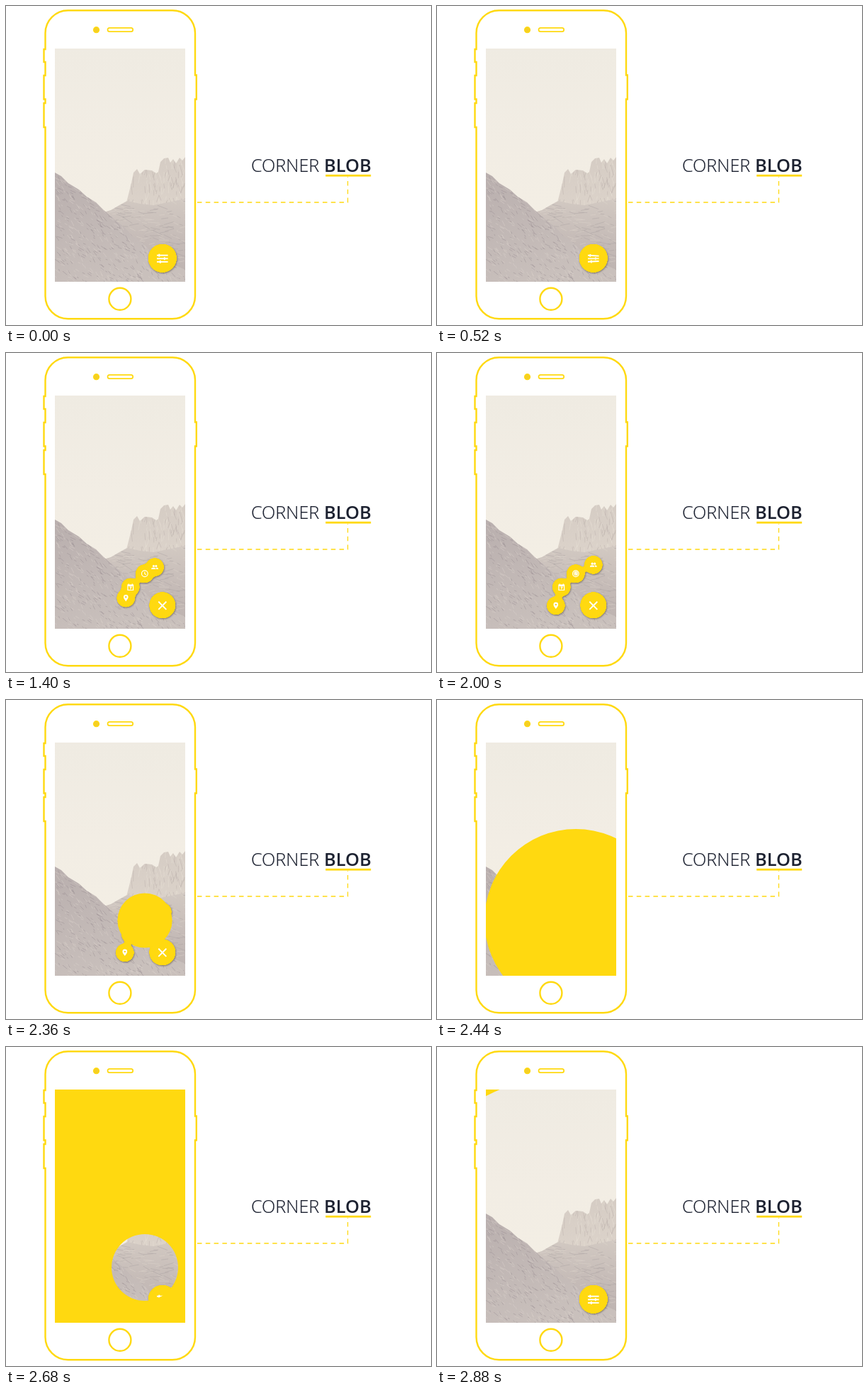
Animation, 600 px wide and 450 px high, one loop 3 s. Source, as an HTML page:

```html
<!DOCTYPE html>
<html lang="en">
<head>
<meta charset="utf-8">
<title>Corner Blob</title>
<style>
html, body { margin: 0; width: 100%; height: 100%; overflow: hidden; background: #fff; }
svg { display: block; width: 100vw; height: 100vh; }
.title { font-family: "Open Sans", sans-serif; fill: #1c2130; }
.line { fill: none; stroke: #ffd910; }
.ico { fill: none; stroke: #fff; stroke-width: 1.9; }
</style>
</head>
<body>
<svg viewBox="0 0 600 450" xmlns="http://www.w3.org/2000/svg">
  <defs>
    <clipPath id="screen"><rect x="69" y="60" width="184" height="329"/></clipPath>
    <clipPath id="nearClip"><use href="#near"/></clipPath>
    <clipPath id="farClip"><use href="#far"/></clipPath>
    <clipPath id="peakClip"><use href="#peaks"/></clipPath>
    <linearGradient id="sky" x2="0" y2="1">
      <stop offset="0" stop-color="#efebe2"/><stop offset=".4" stop-color="#f2ede4"/><stop offset=".7" stop-color="#f3eee4"/>
    </linearGradient>
    <linearGradient id="peakFill" x2="0" y2="1">
      <stop offset="0" stop-color="#d5ccc4"/><stop offset="1" stop-color="#ddd4cb"/>
    </linearGradient>
    <linearGradient id="farFill" x2="0" y2="1">
      <stop offset="0" stop-color="#d2c9c2"/><stop offset=".5" stop-color="#c5bbb7"/><stop offset="1" stop-color="#bbb1af"/>
    </linearGradient>
    <linearGradient id="nearFill" x2=".4" y2="1">
      <stop offset="0" stop-color="#b9afae"/><stop offset="1" stop-color="#c9c0bc"/>
    </linearGradient>
    <filter id="goo" x="130" y="270" width="130" height="125" filterUnits="userSpaceOnUse" color-interpolation-filters="sRGB">
      <feGaussianBlur stdDeviation="2.8"/>
      <feColorMatrix values="1 0 0 0 0  0 1 0 0 0  0 0 1 0 0  0 0 0 18 -7.8" result="blob"/>
      <feDropShadow in="blob" dx=".6" dy="1" stdDeviation=".8" flood-color="#3a3020" flood-opacity=".5"/>
    </filter>
  </defs>

  <rect width="600" height="450" fill="#fff"/>

  <g clip-path="url(#screen)">
    <rect x="69" y="60" width="184" height="329" fill="url(#sky)"/>
    <path id="peaks" fill="url(#peakFill)" d="M160 292L170 277 177 250 180 235 185 230 189 237 196 231 206 232 212 236 215 234 218 220 223 215 229 214 232 221 236 216 240 222 245 214 249 218 253 213V300Z"/>
    <g id="peakLines" clip-path="url(#peakClip)"></g>
    <path id="far" fill="url(#farFill)" d="M138 291L148 288 160 281 171 275 190 279 208 281 228 277 253 272V389H138Z"/>
    <g id="farLines" clip-path="url(#farClip)"></g>
    <path id="near" fill="url(#nearFill)" d="M69 235L78 240 88 250 103 259 114 269 127 277 139 289 153 301 168 313 180 326 194 335 206 348 226 360 253 372V389H69Z"/>
    <g id="nearLines" clip-path="url(#nearClip)"></g>

    <g id="goos" fill="#ffd910" filter="url(#goo)"></g>
    <g id="icons"></g>
    <g id="fabIcon" class="ico"></g>
    <circle id="ripple" fill="#fff"/>
    <path id="cover" fill="#ffd910" fill-rule="evenodd"/>
  </g>

  <g class="line" stroke-width="2.4">
    <path d="M87.500 6.300H235A32 32 0 0 1 267 38.300V97.500H268.800V131.500H267V409.200A32 32 0 0 1 235 441.200H87.500A32 32 0 0 1 55.500 409.200V171H53.500V137H55.500V131.500H53.500V98H55.500V79H53.500V61H55.500V38.300A32 32 0 0 1 87.500 6.300Z"/>
    <circle cx="160.900" cy="413.300" r="15.500"/>
    <rect x="143.500" y="30.800" width="35.700" height="5.300" rx="2.650" stroke-width="1.700"/>
    <circle cx="127.500" cy="33.700" r="3.900" stroke-width="1.400" fill="#f4cf25"/>
  </g>

  <text class="title" x="345.900" y="234" font-size="25.200" font-weight="300" stroke="#1c2130" stroke-width=".2">CORNER</text>
  <text class="title" x="448.900" y="234" font-size="25.400" font-weight="600">BLOB</text>
  <rect x="451.200" y="237.800" width="64" height="2.800" fill="#ffd910"/>
  <path class="line" stroke-width="1.300" stroke-dasharray="6.500 5.300" d="M270 277H482.500V241"/>
</svg>

<script>
const LOOP = 3000, STEP = 40;
const FAB = { x: 220.8, y: 356.3 };
const TAP = { x: 196, y: 311 };
const $ = id => document.getElementById(id);

function add(parent, tag, attrs) {
  const el = document.createElementNS("http://www.w3.org/2000/svg", tag);
  set(el, attrs);
  parent.appendChild(el);
  return el;
}
function set(el, attrs) {
  for (const k in attrs) el.setAttribute(k, attrs[k]);
}

// Time helpers
const clamp = v => Math.max(0, Math.min(1, v));
const span = (t, a, b) => clamp((t - a) / (b - a));
const smooth = p => p * p * (3 - 2 * p);
const mix = (a, b, p) => a + (b - a) * p;
const backOut = p => 1 + 2.2 * (p - 1) ** 3 + 1.2 * (p - 1) ** 2;

// Rock texture
let seed = 11;
const rnd = () => (seed = (seed * 16807) % 2147483647) / 2147483647;
function strokes(id, n, box, angle, len, tones) {
  for (const tone of tones) {
    let d = "";
    for (let i = 0; i < n; i++) {
      const x = box[0] + rnd() * box[2], y = box[1] + rnd() * box[3];
      const a = angle + (rnd() - 0.5) * 0.9, l = len * (0.4 + rnd());
      d += `M${x.toFixed(1)} ${y.toFixed(1)}l${(l * Math.cos(a)).toFixed(1)} ${(l * Math.sin(a)).toFixed(1)}`;
    }
    add($(id), "path", { d, fill: "none", stroke: tone, "stroke-width": 1, opacity: 0.45 });
  }
}
strokes("peakLines", 70, [165, 213, 88, 75], 1.6, 11, ["#b9aea9", "#e6dfd6"]);
strokes("farLines", 100, [138, 272, 115, 115], 0.15, 12, ["#a99f9f", "#ddd5cd"]);
strokes("nearLines", 420, [69, 235, 184, 154], 0.75, 6, ["#978d91", "#dbd3cd"]);

// Menu items in polar form around the button
const ITEMS = [
  { angle: 0, dist: 53, parent: 1,
    icon: '<path fill="#fff" fill-rule="evenodd" d="M0 5C-1 3.400-3.500 1-3.500-1.400A3.500 3.500 0 0 1 3.500-1.400C3.500 1 1 3.400 0 5ZM0-2.700A1.300 1.300 0 1 0 0-.1A1.300 1.300 0 1 0 0-2.700Z"/>' },
  { angle: 30, dist: 52,
    icon: '<path fill="#fff" fill-rule="evenodd" d="M-4.600-3.900H-3.300V-5H-2V-3.900H2V-5H3.300V-3.900H4.600V5H-4.600ZM-3.300-1.300V3.800H3.300V-1.300Z"/><path fill="none" stroke="#fff" stroke-width="1.200" d="M-1.400-.2H1.200L-.3 3"/>' },
  { angle: 61, dist: 51.5,
    icon: '<g fill="none" stroke="#fff" stroke-width="1.200"><circle r="4.500"/><path d="M0-2.600V.3L2 1.600"/></g>' },
  { angle: 90, dist: 57.5, parent: 2,
    icon: '<g fill="#fff"><circle cx="-1.700" cy="-1.700" r="1.600"/><circle cx="1.900" cy="-1.700" r="1.600"/><path d="M-5 3V2C-5 .2 1.400 .2 1.400 2V3ZM2.200 3V2Q2.200 1.100 1.600.7C3.600.5 5 1.100 5 2V3Z"/></g>' }
];
for (const it of ITEMS) {
  it.dot = add($("goos"), "circle", {});
  it.art = add($("icons"), "g", {});
  it.art.innerHTML = it.icon;
}
const fab = add($("goos"), "circle", { cx: FAB.x, cy: FAB.y - 0.5 });

// Slider bars that fold into a cross
const bars = [-4.6, 0, 4.6].map((y, i) => {
  const g = add($("fabIcon"), "g", {});
  add(g, "path", { d: "M-7.800 0H7.800" });
  const knob = add(g, "path", { d: `M${[-4.5, 3, -3][i]}-2V2` });
  return { g, knob, y };
});

function drawFab(t, open) {
  const p = open ? span(t, 480, 1080) : 0;
  fab.setAttribute("r", mix(20.1, 18.5, smooth(p)));
  bars.forEach((b, i) => {
    const turn = (1 - i) * 45 * p;
    const y = b.y * (1 - clamp(p * 1.6));
    set(b.g, { transform: `translate(${FAB.x} ${FAB.y + y}) rotate(${turn})` });
    b.knob.setAttribute("opacity", 1 - clamp(p * 2));
    if (i === 1) b.g.setAttribute("opacity", 1 - clamp(p * 2));
  });
}

function drawItems(t, open) {
  const out = smooth(span(t, 600, 1070));
  const halve = smooth(span(t, 1080, 1340));
  const fan = t > 1340 ? backOut(span(t, 1340, 1660)) : 0;
  for (const it of ITEMS) {
    const base = it.parent ? ITEMS[it.parent] : it;
    let angle = mix(45, base.angle, halve);
    let dist = base.dist * out;
    if (it.parent) {
      angle += (it.angle - base.angle) * fan;
      dist = mix(dist, it.dist, fan);
    }
    const rad = angle * Math.PI / 180;
    const x = FAB.x - dist * Math.cos(rad), y = FAB.y - dist * Math.sin(rad);
    const r = mix(15.5, 12.9, halve);
    const shown = it.parent ? clamp(fan * 2) : it === ITEMS[1] ? span(dist, 16, 30) : span(halve, 0.2, 0.7);
    set(it.dot, { cx: x, cy: y, r: open && out > 0 ? r : 0 });
    set(it.art, {
      transform: `translate(${x} ${y}) scale(${r / 13 * 0.97})`,
      opacity: open ? shown : 0
    });
  }
}

function drawRipple(t) {
  const second = t >= 2000;
  const p = second ? span(t, 2000, 2200) : span(t, 240, 480);
  const on = (second || t >= 240) && p < 1;
  const at = second ? TAP : FAB;
  set($("ripple"), {
    cx: at.x, cy: at.y,
    r: mix(3.2, second ? 14 : 19, p),
    opacity: on ? 0.7 * (1 - p) : 0
  });
}

function circlePath(c, r) {
  return `M${c.x - r} ${c.y}a${r} ${r} 0 1 0 ${2 * r} 0a${r} ${r} 0 1 0 ${-2 * r} 0Z`;
}
// A disc fills the screen, then a hole opens in it; the screen clip trims both.
function drawCover(t) {
  const grow = 129 + (t - 2440) * 1.13;
  const hole = 47 + (t - 2680) * 1.13;
  let d = t >= 2360 ? circlePath(TAP, grow) : "";
  if (hole > 0) d += circlePath(TAP, hole);
  $("cover").setAttribute("d", d);
}

function render(ms) {
  const t = Math.floor((ms % LOOP) / STEP) * STEP;
  const open = t >= 240 && t < 2600;
  drawFab(t, open);
  drawItems(t, open);
  drawRipple(t);
  drawCover(t);
}

const start = performance.now();
function tick() {
  render(performance.now() - start);
  requestAnimationFrame(tick);
}
render(0);
requestAnimationFrame(tick);
</script>
</body>
</html>
```
